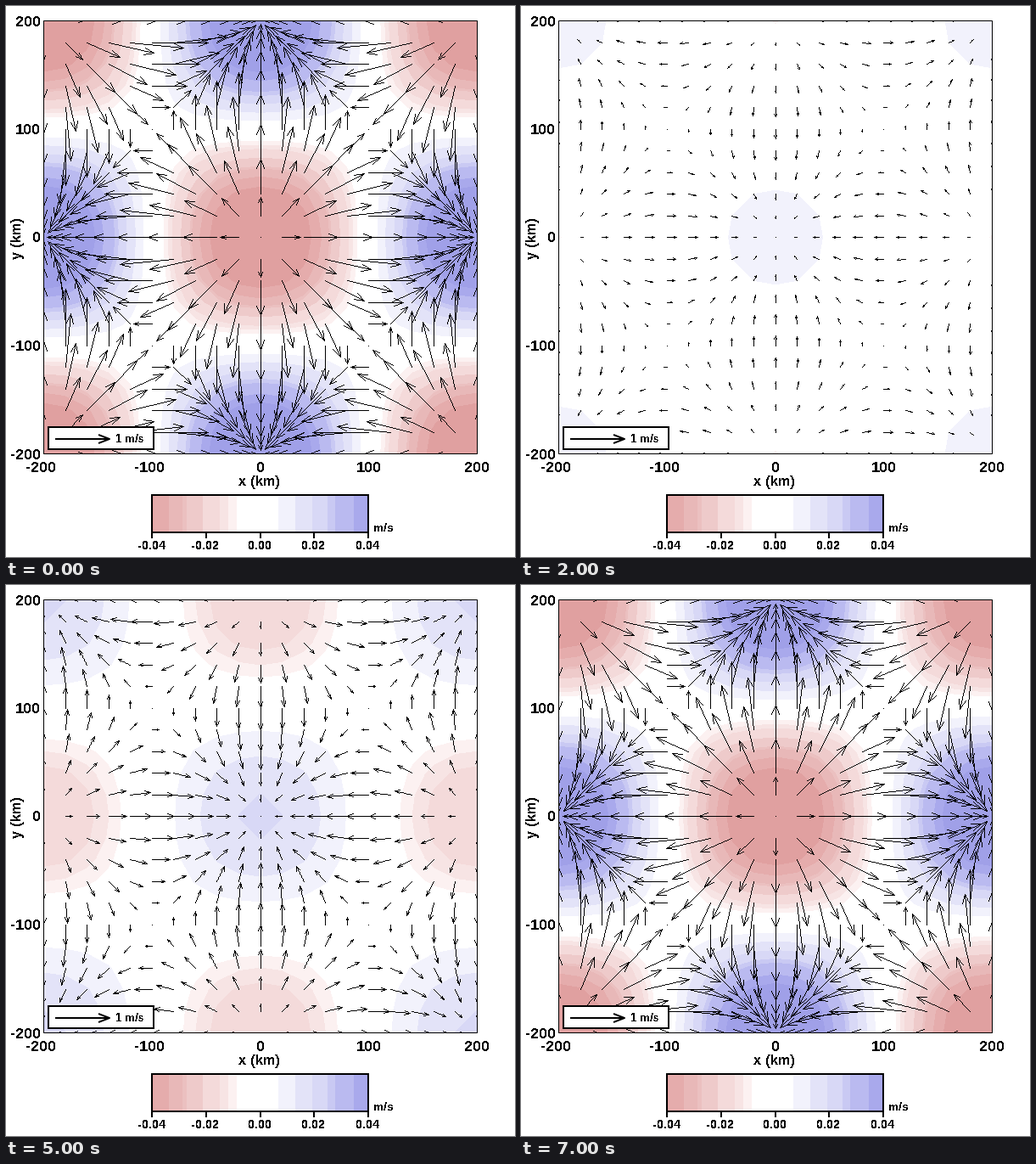
A matplotlib script for the animation above (8 s loop, 600 by 649 pixels).

```python
import numpy as np
import matplotlib.pyplot as plt
from matplotlib.animation import FuncAnimation
from matplotlib.patches import Rectangle

plt.rcParams.update({
    "font.family": "Liberation Sans",
    "font.weight": "bold",
    "text.antialiased": False,
    "text.hinting": "default",
    "text.hinting_factor": 1,
})

W, H, DPI = 600, 649, 100
PX = 72 / DPI  # points per pixel
LEFT, RIGHT, TOP, BOTTOM = 44.5, 555.5, 17.5, 527.5
FRAMES, INTERVAL = 8, 1000

W_MAX = 0.0543              # vertical speed, m/s
PHASE_STEP = np.radians(49.6)
ARROW_GAIN = 1280           # arrow pixels per unit of vertical speed

LEVELS = [-1, -0.0395, -0.0338, -0.0287, -0.0271, -0.0212, -0.0149, -0.0118,
          -0.0086, 0.0067, 0.0130, 0.0193, 0.0250, 0.0278, 0.0347, 0.0395, 1]
COLORS = ["#e0a0a0", "#e5acac", "#e8b8b8", "#ebc0c0", "#eecaca", "#f4dada",
          "#f7e4e4", "#fcf1f1", "#ffffff", "#f2f2fc", "#e3e3f8", "#d8d8f6",
          "#c9c9f3", "#babaf0", "#a9a9ec", "#a0a0e8"]

fig = plt.figure(figsize=(W / DPI, H / DPI), dpi=DPI, facecolor="white")
ax = fig.add_axes([0, 0, 1, 1])
ax.axis("off")


def to_px(x, y):
    """Kilometres to stage pixels."""
    px = (LEFT + RIGHT) / 2 + x * (RIGHT - LEFT) / 400
    py = (TOP + BOTTOM) / 2 - y * (BOTTOM - TOP) / 400
    return px, py


def label(x, y, text, size, ha="center", rotation=0):
    ax.text(x, y, text, fontsize=size * PX, ha=ha, va="baseline",
            rotation=rotation, rotation_mode="anchor", zorder=10)


def box(x0, y0, x1, y1, width, face="none", zorder=6):
    ax.add_patch(Rectangle((x0, y0), x1 - x0, y1 - y0, fc=face, ec="black",
                           lw=width * PX, zorder=zorder, snap=False))


def draw_frame():
    box(LEFT, TOP, RIGHT, BOTTOM, 1)
    for km in range(-200, 201, 100):
        x, y = to_px(km, km)
        label(x - (3 if km < 0 else 0), 549, str(km), 18)
        label(41, y + 6, str(km), 18, ha="right")
    label(298, 565, "x (km)", 17)
    label(18, 273, "y (km)", 17, rotation=90)


def draw_key():
    box(50, 496, 174, 522, 2, face="white", zorder=7)
    style = dict(color="black", lw=2 * PX, zorder=8, solid_capstyle="butt")
    ax.plot([58, 122], [510, 510], **style)
    ax.plot([109, 122, 109], [505, 510, 515], **style)
    label(129, 514, "1 m/s", 13, ha="left")


def draw_colorbar():
    x0, x1, y0, y1 = 172, 427, 576, 620

    def bar_x(value):
        return (x0 + x1) / 2 + value * (x1 - x0) / 0.08

    for low, high, color in zip(LEVELS, LEVELS[1:], COLORS):
        a, b = bar_x(max(low, -0.04)), bar_x(min(high, 0.04))
        ax.add_patch(Rectangle((a, y0), b - a, y1 - y0, fc=color, lw=0,
                               antialiased=False, zorder=5))
    box(x0, y0, x1, y1, 2)
    for value in (-0.04, -0.02, 0, 0.02, 0.04):
        x = bar_x(value)
        ax.plot([x, x], [y1, y1 + 6], color="black", lw=2 * PX, zorder=6)
        label(x - 0.5, 640, f"{value:.2f}", 14)
    label(433, 619, "m/s", 14, ha="left")


draw_frame()
draw_key()
draw_colorbar()

axis_km = np.arange(-200, 201, 20)
X, Y = np.meshgrid(axis_km, axis_km)
GX, GY = to_px(X, Y)
KX, KY = np.pi * X / 200, np.pi * Y / 200

layer = ax.imshow(np.zeros((H, W, 4), np.uint8), extent=(0, W, H, 0),
                  aspect="auto", interpolation="nearest", zorder=4)
ax.set_xlim(0, W)
ax.set_ylim(H, 0)
state = {"fill": None}


def arrow_segments(dx, dy):
    """Shaft and two barbs for every grid point."""
    length = np.hypot(dx, dy)
    angle = np.arctan2(dy, dx)
    tip_x, tip_y = GX + dx, GY + dy
    head = np.minimum(0.3 * length, 12)
    parts = [(GX, GY)]
    for turn in (-1, 1):
        back = angle + turn * np.radians(20)
        parts.append((tip_x - head * np.cos(back),
                      tip_y - head * np.sin(back)))
    return np.concatenate([
        np.stack([px, py, tip_x, tip_y], axis=-1).reshape(-1, 4)
        for px, py in parts])


def plot_lines(segments):
    """Hard-edged black lines, one pixel wide, inside the map window."""
    image = np.zeros((H, W, 4), np.uint8)
    for x0, y0, x1, y1 in np.floor(segments + 1e-6).astype(int):
        n = max(abs(x1 - x0), abs(y1 - y0)) + 1
        cols = np.rint(np.linspace(x0, x1, n)).astype(int)
        rows = np.rint(np.linspace(y0, y1, n)).astype(int)
        inside = ((cols > LEFT) & (cols < RIGHT - 1)
                  & (rows > TOP) & (rows < BOTTOM - 1))
        image[rows[inside], cols[inside], 3] = 255
    return image


def update(i):
    amp = W_MAX * np.cos(PHASE_STEP * i)
    if state["fill"] is not None:
        state["fill"].remove()
    rise = -amp * np.cos(KX) * np.cos(KY)
    state["fill"] = ax.contourf(GX, GY, rise, levels=LEVELS, colors=COLORS,
                                antialiased=False, zorder=1)
    reach = ARROW_GAIN * amp
    dx = reach * np.sin(KX) * np.cos(KY)
    dy = -reach * np.cos(KX) * np.sin(KY)
    layer.set_data(plot_lines(arrow_segments(dx, dy)))
    ax.set_xlim(0, W)
    ax.set_ylim(H, 0)
    return [layer]


anim = FuncAnimation(fig, update, frames=FRAMES, interval=INTERVAL,
                     repeat=True, repeat_delay=0, blit=False)
plt.show()
```
